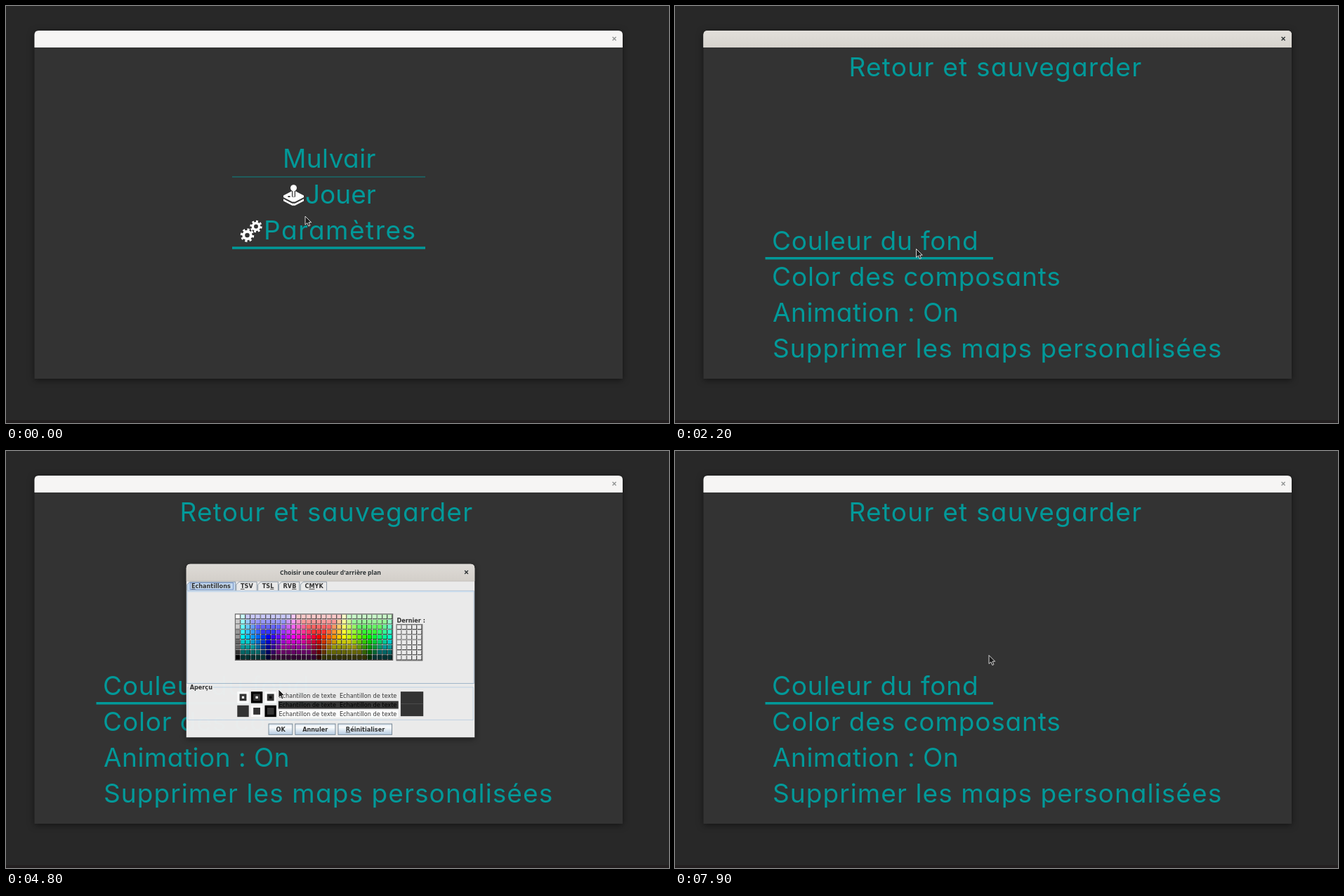
Write an HTML page that moves like this. It is 944x593 px and loops after 8 s.

```html
<!DOCTYPE html>
<html lang="fr">
<head>
<meta charset="utf-8">
<style>
html, body { margin: 0; width: 100%; height: 100%; overflow: hidden; background: #282828; }
svg { display: block; width: 944px; height: 593px; }
.big { font: 37px Inter, Lato, sans-serif; font-feature-settings: "cv11"; fill: #099; }
.ui { font: 8.2px "DejaVu Sans", sans-serif; fill: #333; }
.bold { font-weight: bold; }
.title { font: bold 8.7px "Noto Sans", sans-serif; fill: #2e3436; }
.u { text-decoration: underline; }
.shadow { filter: drop-shadow(0 2px 5px rgba(0, 0, 0, .5)); }
</style>
</head>
<body>
<svg viewBox="0 0 944 593">
  <defs>
    <linearGradient id="bar" x2="0" y2="1"><stop stop-color="#e2dfdb"/><stop offset="1" stop-color="#d7d3cd"/></linearGradient>
    <linearGradient id="button" x2="0" y2="1">
      <stop stop-color="#dde8f3"/><stop offset=".3" stop-color="#fff"/><stop offset="1" stop-color="#b8cfe5"/>
    </linearGradient>
  </defs>
  <path d="M0 589H944V593H0Z" fill="#231f20"/>
  <g class="shadow">
    <path d="M40.5 530V41Q40.5 35 46.5 35H872Q878 35 878 41V530Z" fill="#333"/>
    <path id="header" d="M40.5 59V41Q40.5 35 46.5 35H872Q878 35 878 41V59Z" fill="#f6f5f4"/>
    <path id="focus" d="M40.5 59V41Q40.5 35 46.5 35H872Q878 35 878 41V59Z" fill="url(#bar)"/>
  </g>
  <path id="close" d="M863.6 44l5 5m0-5l-5 5" stroke-width="1.4"/>
  <g id="menu"></g>
  <g id="settings"></g>
  <path id="line" stroke="#099" stroke-width="3.4"/>
  <g id="dialog"></g>
  <path id="cursor" d="M0 0V12L2.9 9.5L4.8 14L6.9 13.1L5 8.7H8.7Z" fill="#1c1c1c" stroke="#fff" stroke-width=".8"/>
</svg>
<script>
const $ = id => document.getElementById(id);
const show = (id, on) => $(id).style.display = on ? '' : 'none';
const clamp = (v, a, b) => Math.min(b, Math.max(a, v));
const range = n => [...Array(n).keys()];
const rect = (x, y, w, h, fill, more = '') =>
  `<rect x="${x}" y="${y}" width="${w}" height="${h}" fill="${fill}" ${more}/>`;
const path = (d, color, w = 1) => `<path d="${d}" fill="none" stroke="${color}" stroke-width="${w}"/>`;
const text = (x, y, s, cls, more = '') => `<text x="${x}" y="${y}" class="${cls}" ${more}>${s}</text>`;
const big = (x, y, s, gap) => text(x, y, s, 'big', `letter-spacing="${gap}"`);
const key = c => `<tspan class="u">${c}</tspan>`;

const gear = (x, y, r) => `<g transform="translate(${x} ${y}) scale(${r / 10})" fill="none" stroke="#fff">
  <circle r="5.4" stroke-width="4"/>
  <circle r="8.4" stroke-width="3.2" pathLength="16" stroke-dasharray="1 1"/></g>`;

const joystick = `<g fill="#fff">
  <path d="M395 269.5L407 263.2H412L424 269.5V272L411.5 278.5H407.5L395 272Z"/>
  <path d="M395 274.3L407.5 280.7H411.5L424 274.3V277.3L411.5 283.8H407.5L395 277.3Z"/>
  <path d="M409.5 262V271.5" stroke="#333" stroke-width="5"/>
  <path d="M409.5 262V271" stroke="#fff" stroke-width="2.6"/>
  <circle cx="409.5" cy="258.7" r="4.5"/>
  <ellipse cx="403" cy="271" rx="2" ry="1.1" fill="#333"/></g>`;

$('menu').innerHTML = big(394, 230, 'Mulvair', .4) + path('M322 243H597', '#0a8686') +
  joystick + big(426, 281, 'Jouer', 0) +
  gear(343.5, 326, 9.7) + gear(356, 313.5, 8.7) + big(367, 332, 'Paramètres', 1.5);

$('settings').innerHTML = big(247.5, 99.5, 'Retour et sauvegarder', 1.25) +
  big(138, 347, 'Couleur du fond', .83) + big(138, 398, 'Color des composants', .85) +
  big(139, 449, 'Animation : On', .5) + big(139, 500, 'Supprimer les maps personalisées', 1.1);

// Colour wheel in 30 steps, lightened in the upper rows and darkened in the lower ones.
const greys = [255, 204, 204, 153, 153, 102, 102, 51, 0];
function swatchColor(col, row) {
  if (!col) return `rgb(${greys[row]},${greys[row]},${greys[row]})`;
  const channel = peak => {
    const d = Math.abs((col - 1 - peak + 45) % 30 - 15);
    const v = 255 * clamp(2 - d / 5, 0, 1);
    return row < 5 ? Math.max(v, 204 - 51 * row) : Math.min(v, 204 - 51 * (row - 5));
  };
  return `rgb(${[15, 25, 5].map(channel)})`;
}
const swatches = (x, y, cols, rows, color) =>
  `<g transform="translate(${x} ${y}) scale(.66)">` +
  rect(-1, -1, cols * 11 + 1, rows * 11 + 1, '#fff', 'stroke="#555" stroke-width="1.5"') +
  range(cols * rows).map(i => {
    const c = i % cols, r = Math.floor(i / cols);
    return rect(c * 11, r * 11, 10, 10, '#000') + rect(c * 11, r * 11, 9, 9, color(c, r));
  }).join('') + '</g>';

const button = (x, w, s, tx, fill = 'url(#button)') =>
  rect(x, 388.7, w, 15.4, fill, 'stroke="#7a8a99"') + text(tx, 399.4, s, 'ui bold');

function preview(color) {
  const square = (i, j, outer, core) => {
    const x = 328.5 + i * 19.7, y = 342.5 + j * 19.7;
    return rect(x, y, 16.5, 16.5, outer) +
      (outer === color ? '' : rect(x + 3.3, y + 3.3, 9.9, 9.9, color)) +
      (core ? rect(x + 6.6, y + 6.6, 3.3, 3.3, core) : '');
  };
  const sample = (y, fill) => [388, 475].map(x =>
    text(x, y, 'Echantillon de texte', 'ui', `style="fill:${fill}"`)).join('');
  return square(0, 0, '#fff', '#fff') + square(1, 0, '#000', '#fff') + square(2, 0, '#fff', '#000') +
    square(0, 1, color) + square(1, 1, '#fff') + square(2, 1, '#000') +
    rect(387.3, 356, 172, 11, color) + rect(387.3, 368.7, 172, 11, '#fff') +
    sample(351.5, color) + sample(364.5, '#000') + sample(377.5, color) +
    rect(562.5, 342.5, 32.5, 17.7, '#333') + rect(562.5, 360, 32.5, 17.7, color);
}

const tab = (x, w, s, on) =>
  `<path d="M${x} 198V189.5L${x + 4} 185.5H${x + w}V198" fill="${on ? '#c8ddf2' : '#eee'}" stroke="#7a8a99" stroke-width=".8"/>` +
  text(x + 6.2, 194.4, s, 'ui bold');

const R = key('R');
$('dialog').innerHTML = `<g class="shadow">
  <path d="M255.5 408V166Q255.5 160 261.5 160H662.5Q668.5 160 668.5 166V408Z" fill="#eee"/>
  <path d="M255.5 184.5V166Q255.5 160 261.5 160H662.5Q668.5 160 668.5 166V184.5Z" fill="url(#bar)"/></g>` +
  text(462, 175, "Choisir une couleur d'arrière plan", 'title', 'text-anchor="middle"') +
  path('M654.3 169.2l4.8 4.8m0-4.8l-4.8 4.8', '#2e3436', 1.4) +
  path('M256 184.5H668', '#bfb8b1', .7) +
  tab(256.5, 69.5, key('E') + 'chantillons', true) + tab(327, 29.5, key('T') + 'SV') +
  tab(358, 29, 'TS' + key('L')) + tab(388, 29.5, 'RV' + key('B')) + tab(419, 37.5, 'C' + key('M') + 'YK') +
  rect(256.5, 198.5, 411, 132.3, 'none', 'stroke="#a3b8cc"') + path('M257 199.3H667', '#c8ddf2', 1.6) +
  `<g id="tabFocus">${rect(261, 187, 61.5, 9.5, 'none', 'stroke="#6382bf" stroke-width=".8"')}</g>` +
  swatches(326.2, 232.2, 31, 9, swatchColor) +
  text(557, 243.6, 'Dernier :', 'ui bold') + swatches(557.3, 247.2, 5, 7, () => '#eee') +
  path('M294 336.3H666.5V383H257.5V336.3H258.5', '#b8cfe5', .8) + text(260.5, 339, 'Aperçu', 'ui bold') +
  `<g id="before">${preview('#333')}</g>` +
  `<g id="after">${preview('#000')}${rect(557.3, 247.2, 6.6, 6.6, '#000')}</g>` +
  button(373.5, 34, 'OK', 384) + `<g id="pressed">${button(373.5, 34, 'OK', 384, '#b8cfe5')}</g>` +
  button(411.5, 57.5, 'Annuler', 422) + button(473, 77, R + 'éinitialiser', 484);

const track = [
  [0, 426, 299], [100, 427, 285], [400, 430, 192], [500, 432, 205], [800, 470, 348], [900, 474, 336],
  [1400, 475.5, 325.5], [1800, 475.5, 325.5], [1900, 460, 366], [2000, 430, 378], [2100, 375, 363],
  [2200, 343.5, 345.5], [2300, 343.5, 345.5], [2800, 343.5, 490], [3200, 343.5, 345.5],
  [3300, 343.5, 372], [3400, 343.5, 407], [3700, 344, 490], [4100, 408, 342], [4400, 388, 339],
  [4800, 388, 339], [5600, 331, 297], [5700, 331, 293], [6700, 331, 293], [7100, 388, 389.5],
  [7600, 388, 389.5], [7900, 447, 290.5]
];
function pointer(t) {
  const i = track.findIndex(p => p[0] > t);
  if (i < 0) return track[track.length - 1].slice(1);
  const a = track[i - 1], b = track[i], k = (t - a[0]) / (b[0] - a[0]);
  return [a[1] + (b[1] - a[1]) * k, a[2] + (b[2] - a[2]) * k];
}

const rowEnds = [453, 560, 413, 790];
function underline(t, y) {
  if (t < 1600) return y < 294 ? 'M383 293H536' : 'M322 344H597';
  if (t < 1900) return '';
  const row = t >= 4500 && t < 7400 ? 0 : clamp(Math.floor((y - 310) / 51.2), 0, 3);
  return `M128.5 ${358.8 + row * 51.2}H${rowEnds[row]}`;
}

function draw(now) {
  const t = Math.floor(now % 8000 / 100) * 100;
  const [x, y] = pointer(t);
  const active = t < 4800 ? clamp((t - 1100) / 300, 0, 1) : 0;
  $('focus').style.opacity = active;
  $('close').setAttribute('stroke', active > .5 ? '#2e3436' : '#929595');
  show('menu', t < 1600);
  show('settings', t >= 1600);
  $('line').setAttribute('d', underline(t, y));

  show('dialog', t >= 4800 && t < 7700);
  const scale = t === 4800 ? .994 : t === 7600 ? .97 : 1;
  $('dialog').setAttribute('transform', `translate(462 284) scale(${scale}) translate(-462 -284)`);
  $('dialog').setAttribute('opacity', t === 4800 ? .98 : t === 7600 ? .6 : 1);
  show('tabFocus', t < 6000);
  show('before', t < 6000);
  show('after', t >= 6000);
  show('pressed', t >= 7400);

  $('cursor').setAttribute('transform', `translate(${x} ${y})`);
  requestAnimationFrame(draw);
}
draw(0);
</script>
</body>
</html>
```
